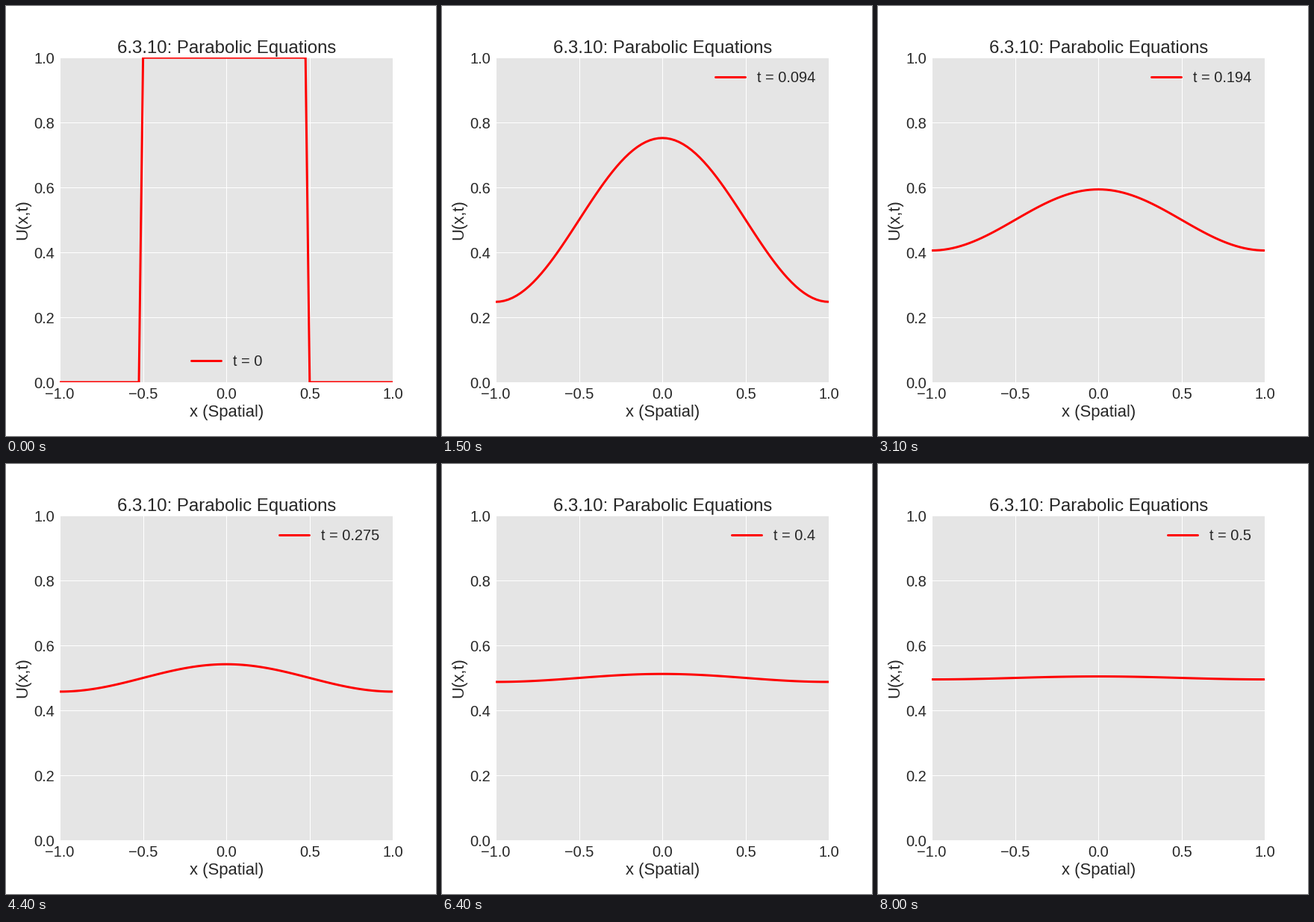
These frames come from a looping animation (576x576 px, 8100 ms). A matplotlib script:

```python
import numpy as np
import matplotlib.pyplot as plt
from matplotlib.animation import FuncAnimation

FRAMES = 81
STEP = 1 / 160
CELLS = 80
INK = "#262626"

plt.rcParams.update({
    "font.family": "Liberation Sans",
    "text.color": INK,
    "axes.labelcolor": INK,
    "xtick.color": INK,
    "ytick.color": INK,
    "lines.solid_capstyle": "round",
    "axes.unicode_minus": True,
})

x = np.linspace(-1, 1, CELLS + 1)


def heat(t):
    """Diffusing square pulse with insulated ends, as a cosine series."""
    if t == 0:
        cell = np.arange(CELLS + 1)
        return np.where((cell >= CELLS // 4) & (cell < 3 * CELLS // 4), 1.0, 0.0)
    n = np.arange(60)[:, None]
    k = np.pi * (2 * n + 1)
    return 0.5 + np.sum(2 * (-1.0) ** n * np.cos(k * x) / k * np.exp(-k**2 * t), axis=0)


fig = plt.figure(figsize=(8, 8), dpi=72, facecolor="white")
ax = fig.add_axes([0.125, 0.125, 0.775, 0.755], facecolor="#E5E5E5")
ax.set(xlim=(-1, 1), ylim=(0, 1),
       xticks=np.linspace(-1, 1, 5), yticks=np.linspace(0, 1, 6))
ax.set_title("6.3.10: Parabolic Equations", fontsize=24, pad=6)
ax.set_xlabel("x (Spatial)", fontsize=22)
ax.set_ylabel("U(x,t)", fontsize=22)
ax.tick_params(length=0, pad=7, labelsize=20)
ax.grid(color="white", linewidth=1)
ax.set_axisbelow(True)
ax.spines[:].set_visible(False)
curve, = ax.plot(x, heat(0), color="red", linewidth=3)


def update(i):
    t = i * STEP
    curve.set_ydata(heat(t))
    curve.set_label(f"t = {round(t, 3):g}")
    ax.legend(loc="best", fontsize=20, frameon=False)
    return curve,


anim = FuncAnimation(fig, update, frames=FRAMES, interval=100,
                     repeat=True, repeat_delay=0, blit=False)
plt.show()
```
